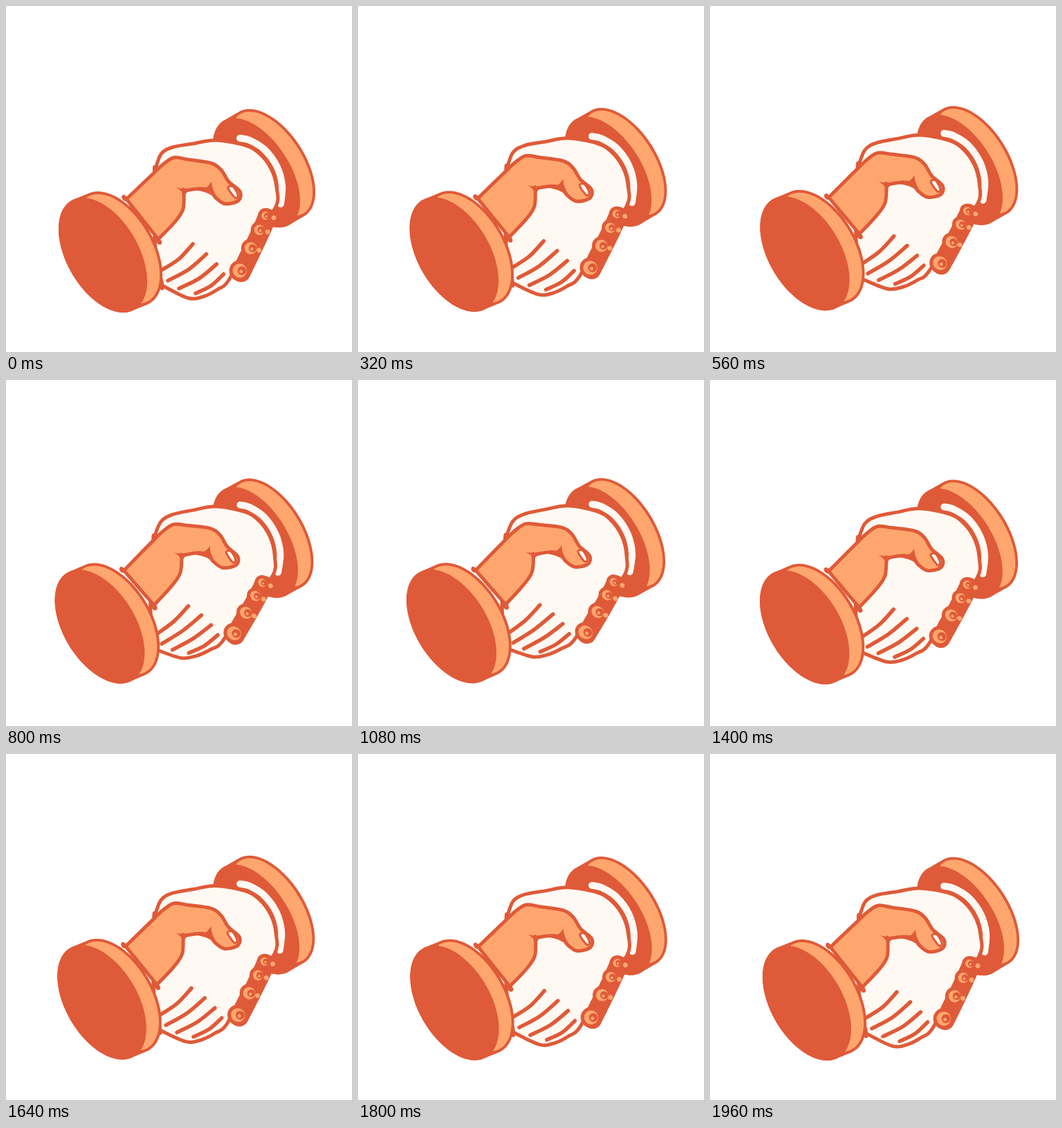
These frames come from a looping animation (500 px wide and 500 px high, 2000 ms). An HTML page:

```html
<!DOCTYPE html>
<html lang="en">
<head>
<meta charset="utf-8">
<title>Handshake</title>
<style>
html, body { margin: 0; width: 100%; height: 100%; overflow: hidden; background: #fff; }
svg { display: block; width: 100vw; height: 100vh; }
path { stroke-linecap: round; stroke-linejoin: round; }
</style>
</head>
<body>
<svg id="stage" viewBox="0 0 500 500"></svg>
<script>
const RED = '#df5a38', PEACH = '#ffa66e', CREAM = '#fff9f3';
const LOOP = 2000, STEP = 40, TAU = 2 * Math.PI;
const stage = document.getElementById('stage');
const parts = [], cuffs = [];

function make(parent, tag, attrs) {
  const el = document.createElementNS('http://www.w3.org/2000/svg', tag);
  for (const key in attrs) el.setAttribute(key, attrs[key]);
  parent.append(el);
  return el;
}

// Catmull-Rom curve; a repeated point makes a sharp corner.
function smooth(pts, closed) {
  const n = pts.length;
  const at = i => closed ? pts[(i + n) % n] : pts[Math.max(0, Math.min(n - 1, i))];
  let d = 'M' + pts[0];
  for (let i = 0; i < (closed ? n : n - 1); i++) {
    const [a, b, c, e] = [at(i - 1), at(i), at(i + 1), at(i + 2)];
    const c1 = b.map((v, k) => v + (c[k] - a[k]) / 6);
    const c2 = c.map((v, k) => v - (e[k] - b[k]) / 6);
    d += `C${c1} ${c2} ${c}`;
  }
  return d + (closed ? 'Z' : '');
}

// The clasp is pulled up between the two wrists, its lower side most.
function bend([x, y], lift) {
  const u = Math.max(0, Math.min(1, (x - 176) / 214));
  const rise = 4 + 5 * u + Math.sin(Math.PI * u) * (11 + 0.05 * (y - 300));
  return [x - lift * (5 + 0.05 * (y - 300)), y - lift * rise];
}

const read = text => text.trim().split(/\s+/).map(p => p.split(',').map(Number));

function add(points, fill, stroke, width) {
  const el = make(stage, 'path', { fill, stroke, 'stroke-width': width });
  parts.push({ el, points, closed: fill !== 'none' });
}
const shape = (text, fill, width = 0) => add(read(text), fill, RED, width);
const line = (points, color, width) => add(points, 'none', color, width);

function disc(x, y, r, fill, width = 0) {
  const ring = Array.from({ length: 8 }, (_, i) =>
    [x + r * Math.cos(i * TAU / 8), y + r * Math.sin(i * TAU / 8)]);
  add(ring, fill, RED, width);
}

// A thick disc: red face and sides, with a peach rim on the far side.
function cuff({ x, y, rx, ry, tilt, depth, move, turn }) {
  const group = make(stage, 'g', {});
  const a = tilt * Math.PI / 180, [vx, vy] = depth;
  const oval = (inset, offset) => Array.from({ length: 90 }, (_, i) => {
    const t = i * TAU / 90, c = Math.cos(t), s = Math.sin(t);
    const nx = c / rx * Math.cos(a) - s / ry * Math.sin(a);
    const ny = c / rx * Math.sin(a) + s / ry * Math.cos(a);
    const k = offset(nx * vx + ny * vy);
    const px = (rx - inset) * c, py = (ry - inset) * s;
    return [x + px * Math.cos(a) - py * Math.sin(a) + k * vx,
            y + px * Math.sin(a) + py * Math.cos(a) + k * vy];
  });
  const put = (points, fill) => make(group, 'path', { d: 'M' + points.join('L') + 'Z', fill });
  put(oval(0, side => side > 0 ? 1 : 0), RED);
  put(oval(4, () => 1), PEACH);
  put(oval(0, () => 0), RED);
  cuffs.push({ group, x, y, move, turn });
}

cuff({ x: 362, y: 241, rx: 89, ry: 48, tilt: 57, depth: [22, -13], move: [-2, -7], turn: 2 });

// Cream hand and shirt edge
line(read('338,191 352,194 373,207 391,231 399,259 397,286'), CREAM, 10);
shape(`215,239 215,239 224,214 241,204 270,199 303,194 345,201 366,213 383,235 391,262 389,292
  350,340 322,396 305,410 285,420 263,422 226,404 226,404 215,340`, CREAM, 5);
for (let i = 0; i < 4; i++) {
  const top = [270 + 22 * i - 2.4 * i * i, 344 + 14.5 * i];
  const end = [226 + 4 * i + 4 * i * i, 381 + 18 * i - 2.2 * i * i];
  line([top, [(top[0] + end[0]) / 2 + 2, (top[1] + end[1]) / 2 + 3], end], RED, 5.5);
}

// Curled fingertips
const tips = [0, 1, 2, 3].map(i =>
  [375 - 7.3 * i - 1.7 * i * i, 303 + 17.5 * i + 3 * i * i, 8.5 + 1.4 * i]);
line(tips.map(([x, y]) => [x + 2, y + 3]), RED, 27);
tips.forEach(([x, y, r], i) => {
  disc(x, y, r, PEACH, 5);
  disc(x + 0.25 * r, y, 0.5 * r, RED);
  disc(x + 0.15 * r, y + 0.1 * r, 0.2 * r, PEACH);
  if (i < 3) disc(x + 12, y + 3, 3.5, PEACH);
});

// Peach hand
shape(`174,279 174,279 195,259 215,240 228,228 243,219 264,222 296,227 311,237 322,254 338,268
  336,281 317,286 303,277 295,267 280,264 257,267 257,267 256,293 244,312 220,337 220,337`, PEACH, 5);
shape('270,265 270,265 288,263 297,254 297,254 299,264 306,279 306,279 290,270', RED);
shape('246,262 246,262 257,264 274,263 274,263 261,270 257,282 257,282 254,269', RED);
shape('321,263 328,261 335,273 331,277', CREAM, 3);

cuff({ x: 140, y: 360, rx: 91, ry: 52, tilt: 60, depth: [22, -9], move: [-5, -4], turn: -1.5 });

function draw(now) {
  const t = Math.floor((now % LOOP) / STEP) * STEP;
  const lift = (1 - Math.cos(TAU * t / LOOP)) / 2;
  for (const { el, points, closed } of parts) {
    el.setAttribute('d', smooth(points.map(p => bend(p, lift)), closed));
  }
  for (const { group, x, y, move, turn } of cuffs) {
    const [dx, dy] = move.map(v => v * lift);
    group.setAttribute('transform', `translate(${dx} ${dy}) rotate(${turn * lift} ${x} ${y})`);
  }
}

let start = null;
function tick(now) {
  start ??= now;
  draw(now - start);
  requestAnimationFrame(tick);
}
draw(0);
requestAnimationFrame(tick);
</script>
</body>
</html>
```
